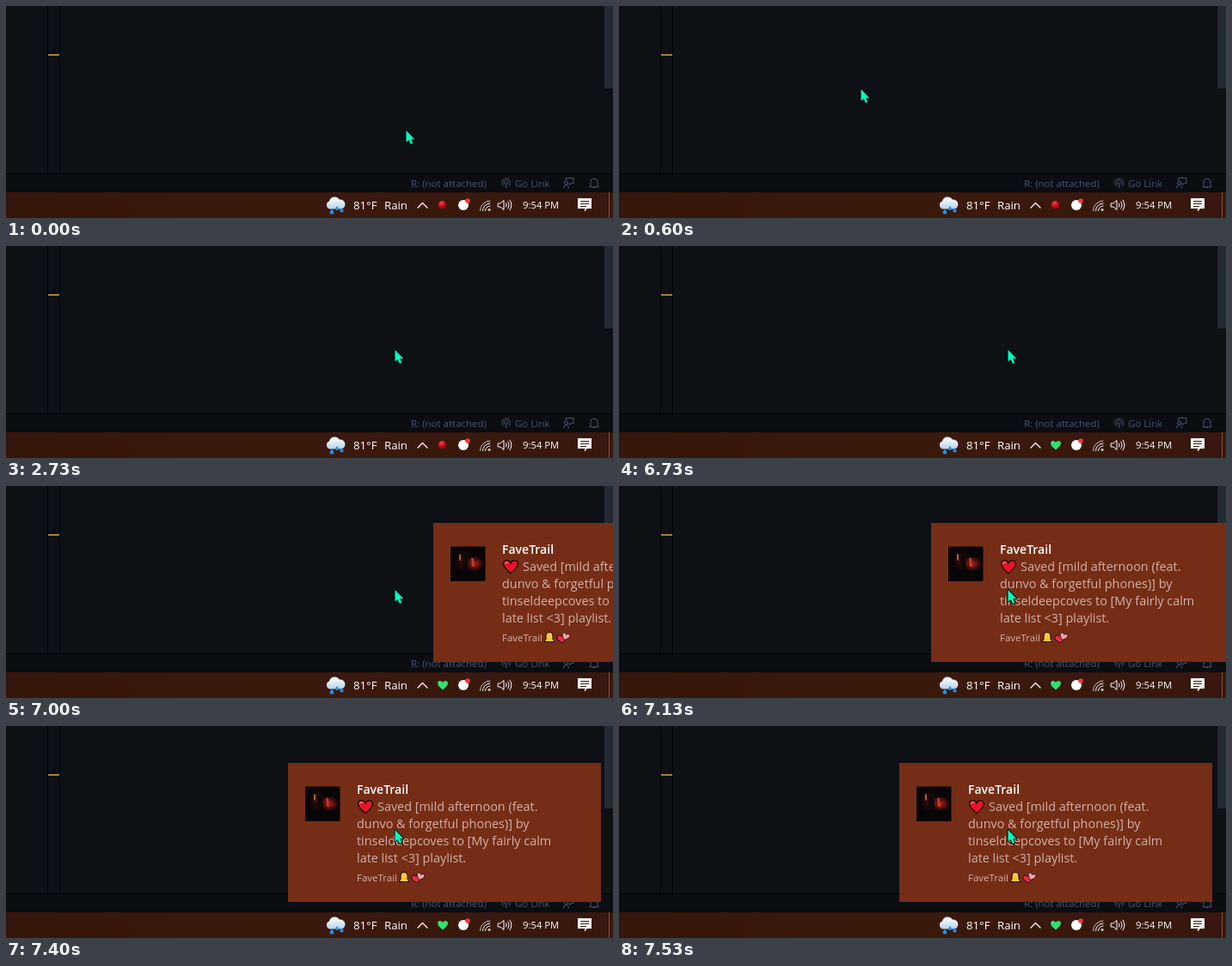
Recreate the animation shown at these times as an HTML page. Size 706 by 247 pixels, loop 8590 ms.

```html
<!DOCTYPE html>
<html lang="en">
<head>
<meta charset="utf-8">
<title>Saved song notification</title>
<style>
  html, body { margin: 0; width: 100%; height: 100%; overflow: hidden; background: #0d1015; }
  svg { display: block; width: 706px; height: 247px; font-family: "Open Sans", "Noto Sans", sans-serif; }
  .line { fill: none; stroke-linecap: round; stroke-linejoin: round; }
</style>
</head>
<body>
<svg viewBox="0 0 706 247">
  <defs>
    <linearGradient id="bar">
      <stop offset="0" stop-color="#35160b"/>
      <stop offset=".5" stop-color="#3a190d"/>
      <stop offset="1" stop-color="#37170e"/>
    </linearGradient>
    <linearGradient id="cloud" x2="0" y2="1">
      <stop offset=".2" stop-color="#f4f8fc"/>
      <stop offset="1" stop-color="#b3d0ee"/>
    </linearGradient>
    <radialGradient id="ball" cx=".4" cy=".3" r=".7">
      <stop offset="0" stop-color="#f0505a"/>
      <stop offset=".45" stop-color="#d0121f"/>
      <stop offset="1" stop-color="#930811"/>
    </radialGradient>
    <radialGradient id="glow">
      <stop offset="0" stop-color="#a8201a"/>
      <stop offset="1" stop-color="#a8201a" stop-opacity="0"/>
    </radialGradient>
    <path id="heart" d="M0 5.5C-3 3-6 .5-6-2.2C-6-5.6-1.6-6.2 0-3C1.6-6.2 6-5.6 6-2.2C6 .5 3 3 0 5.5Z"/>
  </defs>

  <!-- editor -->
  <rect width="706" height="247" fill="#0d1015"/>
  <path d="M48.5 0V195M62.5 0V195" stroke="#020305"/>
  <rect x="49" y="56" width="13" height="2" fill="#a88134"/>
  <rect x="696" width="10" height="96" fill="#222a34"/>

  <!-- status bar -->
  <rect y="195" width="706" height="22" fill="#0a0d12"/>
  <path d="M0 195.5H706" stroke="#020305"/>
  <g fill="#46536c" font-size="11.5">
    <text x="471" y="211">R: (not attached)</text>
    <text x="592" y="211">Go Link</text>
  </g>
  <g class="line" stroke="#4a5770">
    <path d="M578.6 210A5 5 0 1 1 584.8 210M579.8 207.6A2.6 2.6 0 1 1 583.6 207.6M581.7 206V212"/>
    <path d="M651 203V200.5H660V206.5H657.5L655.5 208.5V206.5M648.5 212Q648.5 208.5 651.5 208.5T654.5 212"/>
    <circle cx="651.5" cy="206" r="2"/>
    <path d="M679 210.5L680 208.5V205Q680 201 684 201T688 205V208.5L689 210.5ZM682.7 211Q684 213.5 685.3 211"/>
  </g>

  <!-- taskbar -->
  <rect y="217" width="706" height="30" fill="url(#bar)"/>
  <path d="M701.5 217V247" stroke="#8f4a33"/>
  <path d="M377 236.5A4.6 4.6 0 0 1 376 227.6A6.4 6.4 0 0 1 387.8 225.6A5.4 5.4 0 0 1 390 236.5Z" fill="url(#cloud)"/>
  <path d="M379 236.5q-5 6 0 6t0-6M385 233q-4 5 0 5t0-5M390.5 235q-4.4 5.4 0 5.4t0-5.4" fill="#2591e6"/>
  <g fill="#fff" font-size="13.2">
    <text x="404" y="237">81°F</text>
    <text x="440" y="237">Rain</text>
    <text x="601" y="236" font-size="11.3">9:54 PM</text>
  </g>
  <path class="line" d="M479 235L484.5 229.5L490 235" stroke="#fff" stroke-width="1.2"/>
  <circle id="idle" cx="507.5" cy="231.5" r="4.7" fill="url(#ball)"/>
  <use id="liked" href="#heart" x="508" y="232" fill="#35e06c"/>
  <circle cx="532" cy="232" r="6" fill="#fff"/>
  <circle cx="537" cy="227" r="2.8" fill="#ee3b40"/>
  <g class="line" stroke="#fff">
    <path d="M551.5 238.5A11.5 11.5 0 0 1 563 227" stroke="#c9bfbb"/>
    <path d="M554.5 238.5A8.5 8.5 0 0 1 563 230M557.5 238.5A5.5 5.5 0 0 1 563 233"/>
    <circle cx="562" cy="237.5" r="1"/>
    <path d="M572.5 230H575L579 226.5V237.5L575 234H572.5Z"/>
    <path d="M581.5 230Q583 232 581.5 234M583.7 228Q586.5 232 583.7 236M586 226.2Q590 232 586 237.8"/>
  </g>
  <path d="M665 224H681V236H676L673 239.5V236H665Z" fill="#fff"/>
  <path d="M668 227.5H678M668 230.5H678M668 233.5H675" stroke="#37170e"/>

  <!-- notification -->
  <g id="toast">
    <rect width="364" height="162" fill="#762d16"/>
    <g transform="translate(20 27.5)">
      <rect width="40.5" height="40.5" fill="#080506"/>
      <ellipse cx="28" cy="20" rx="11" ry="9" fill="url(#glow)"/>
      <ellipse cx="15" cy="17" rx="10" ry="12" fill="url(#glow)" opacity=".35"/>
      <path d="M14 12Q18 9 20 13L21 25L14 26Z" fill="#100809"/>
      <path d="M10 9H12V16H10Z" fill="#b0632c"/>
      <path d="M24 13L27 14L28 24L25 23Z" fill="#c23a29"/>
    </g>
    <text x="80" y="36" font-size="14" font-weight="600" fill="#fff">FaveTrail</text>
    <g font-size="14.4" fill="#d0b2a8">
      <text x="104" y="56">Saved [mild afternoon (feat.</text>
      <text x="80" y="76">dunvo &amp; forgetful phones)] by</text>
      <text x="80" y="96">tinseldeepcoves to [My fairly calm</text>
      <text x="80" y="116">late list &lt;3] playlist.</text>
      <text x="80" y="138" font-size="11.5">FaveTrail</text>
    </g>
    <g stroke="#180605">
      <use href="#heart" transform="translate(90 51) scale(1.4)" fill="#e81526" stroke-width="1"/>
      <path d="M83.5 47Q85 45 87 46" class="line" stroke="#f7737c" stroke-width="1.4"/>
      <path d="M129 138.5L131 135.5V132Q131 127.5 135 127.5T139 132V135.5L141 138.5ZM133.2 139Q135 141.5 136.8 139" fill="#ffc736"/>
      <use href="#heart" transform="translate(149.5 135) rotate(-10) scale(.9)" fill="#e92d47"/>
      <use href="#heart" transform="translate(154 132.5) rotate(18) scale(.75)" fill="#f3a0a8"/>
    </g>
  </g>

  <path id="cursor" d="M.5 0V13.5L3.7 11.2L5.9 16L8.2 15L6 10.3H10.2Z" fill="#00ffbe" stroke="#06100e" stroke-width="2" stroke-linejoin="round" paint-order="stroke"/>
</svg>
<script>
const LOOP = 8590;
const byId = id => document.getElementById(id);
const [idle, liked, toast, cursor] = ["idle", "liked", "toast", "cursor"].map(byId);

// Cursor moves: first tick, last tick, end x, end y
const start = [465, 145];
const moves = [
  [0, 4, 283, 117],
  [7, 9, 281, 97],
  [15, 19, 391, 110],
  [25, 26, 393, 113],
  [27, 34, 446, 120],
  [39, 41, 452, 121],
];
const LIKE = 101, SLIDE = 105;

const ease = p => p * p * (3 - 2 * p);
const place = (el, x, y) => el.setAttribute("transform", `translate(${Math.round(x)} ${Math.round(y)})`);
const show = (el, on) => el.setAttribute("visibility", on ? "visible" : "hidden");

function cursorAt(tick) {
  let [x, y] = start;
  for (const [from, to, endX, endY] of moves) {
    const p = ease(Math.min(1, Math.max(0, (tick - from) / (to - from))));
    x += (endX - x) * p;
    y += (endY - y) * p;
  }
  return [x, y];
}

function draw(now) {
  // 15 ticks per second, rounded to hundredths
  const tick = Math.floor((Math.floor(now % LOOP / 10) + .5) * .15);
  place(cursor, ...cursorAt(tick));
  show(idle, tick < LIKE);
  show(liked, tick >= LIKE);
  show(toast, tick >= SLIDE);
  place(toast, 326 + 171 * .465 ** (tick - SLIDE), 43);
}

const t0 = performance.now();
function loop() {
  draw(performance.now() - t0);
  requestAnimationFrame(loop);
}
loop();
</script>
</body>
</html>
```
